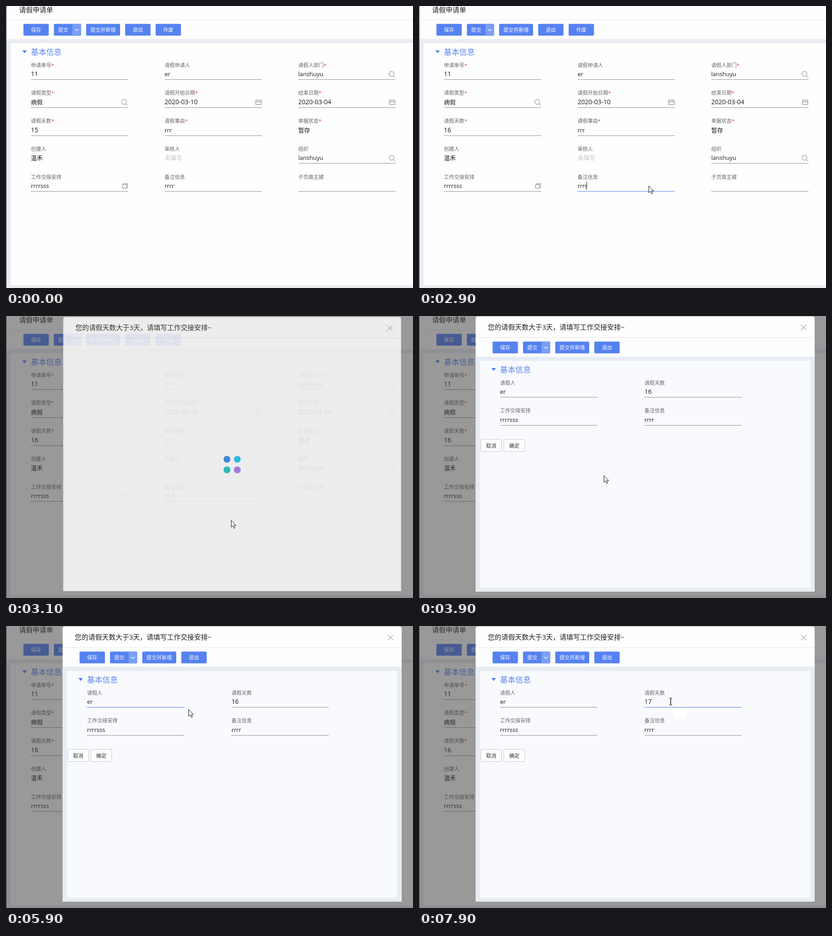
Write an HTML page that moves like this. It is 899 px wide and 623 px high and loops after 8 s.

```html
<!DOCTYPE html>
<html lang="zh">
<head>
<meta charset="utf-8">
<style>
  html, body { margin: 0; width: 100%; height: 100%; overflow: hidden; background: #fefefe; }
  svg { display: block; width: 899px; height: 623px; }
  text { font-family: "Open Sans", "Noto Sans CJK SC", "Noto Sans CJK", sans-serif; fill: #1c1c1c; white-space: pre; }
  .label { font-size: 11.25px; fill: #666; }
  .value { font-size: 13px; }
  .number { font-size: 14px; }
  .empty { fill: #c4c4c4; }
  .title { font-size: 15px; fill: #222; }
  .section { font-size: 17px; fill: #5a84ee; }
  .button { font-size: 11.25px; font-weight: 500; fill: #fff; text-anchor: middle; }
  .plain { font-size: 11.25px; fill: #333; text-anchor: middle; }
  .icon { fill: none; stroke: #777; }
</style>
</head>
<body>
<svg id="stage" viewBox="0 0 899 623"></svg>
<script>
const BLUE = '#5682f1', GREY = '#909090';
const rect = (x, y, w, h, fill, more = '') =>
  `<rect x="${x}" y="${y}" width="${w}" height="${h}" fill="${fill}" ${more}/>`;
const text = (x, y, kind, s, more = '') => `<text x="${x}" y="${y}" class="${kind}" ${more}>${s}</text>`;
const path = (d, more = 'class="icon"') => `<path d="${d}" ${more}/>`;
const group = (id, inner, more = '') => `<g id="${id}" ${more}>${inner}</g>`;
const caret = (id, y) => rect(0, y, 1, 18, '#111', `id="${id}"`);

// icons are drawn relative to the field's left end and label centre
const icons = {
  search: '<circle cx="206" cy="19.5" r="5.5" class="icon"/>' + path('M210 23.500l4 4'),
  date: path('M201.500 16h12v9.500h-12zm0 3.500h12m-9-5v2m6-2v2'),
  popup: path('M202.500 17h8.500v8h-8.500zm2 0v-2h9v8.500h-2.500')
};

function field(x, y, { label, value, must, empty, bare, icon, id = '' }) {
  const kind = (/^\d/.test(value) ? 'value number' : 'value') + (empty ? ' empty' : '');
  return text(x, y + 4, 'label', label + (must ? '<tspan fill="#f04040">*</tspan>' : '')) +
    text(x, y + 24.5, kind, value, id && `id="${id}"`) +
    (bare ? '' : rect(x, Math.floor(y + 32), 215, 1, GREY, id && `id="${id}Line"`)) +
    (icon ? `<g transform="translate(${x} ${y})">${icons[icon]}</g>` : '');
}

const grid = (list, columns, pitch) => list.map((f, i) =>
  field(55 + i % columns * pitch, 130.5 + 61.75 * Math.floor(i / columns), f)).join('');

function toolbar(labels) {
  let x = 38.5;
  return labels.map(label => {
    const split = label === '提交', w = label.length > 2 ? 75 : split ? 60 : 56;
    const s = rect(x, 39.5, w, 26, BLUE, 'rx="2"') +
      (split ? rect(x + 41, 39.5, w - 41, 26, '#7b9ff5', 'rx="2"') +
        path(`M${x + 46.5} 51l4 4 4-4`, 'fill="none" stroke="#fff" stroke-width="1.2"') : '') +
      text(x + (split ? 20.5 : w / 2), 57, 'button', label);
    x += w + 11.25;
    return s;
  }).join('');
}

const section = path('M36 98h10l-5 6.500z', `fill="${BLUE}"`) + text(55, 108, 'section', '基本信息');
const actions = ['保存', '提交', '提交并新增', '退出'];

const page = rect(0, 0, 899, 623, '#fefefe') + rect(0, 30, 899, 1, '#e8eaed') +
  rect(0, 73, 899, 550, '#e9ecf1') + rect(10, 82, 889, 535, '#fefefe') + rect(0, 0, 1, 623, '#39424c') +
  text(29, 13.5, 'title', '请假申请单') + toolbar([...actions, '作废']) + section +
  grid([
    { label: '申请单号', value: '11', must: true },
    { label: '请假申请人', value: 'er' },
    { label: '请假人部门', value: 'lanshuyu', must: true, icon: 'search' },
    { label: '请假类型', value: '病假', must: true, icon: 'search' },
    { label: '请假开始日期', value: '2020-03-10', must: true, icon: 'date' },
    { label: '结束日期', value: '2020-03-04', must: true, icon: 'date' },
    { label: '请假天数', value: '15', must: true, id: 'days' },
    { label: '请假事由', value: 'rrr', must: true },
    { label: '单据状态', value: '暂存', must: true, bare: true },
    { label: '创建人', value: '温禾', bare: true },
    { label: '审核人', value: '未填写', bare: true, empty: true },
    { label: '组织', value: 'lanshuyu', icon: 'search' },
    { label: '工作交接安排', value: 'rrrrsss', icon: 'popup' },
    { label: '备注信息', value: 'rrrr', id: 'memo' },
    { label: '子页面主键', value: '' }
  ], 3, 295.25) + caret('daysCaret', 265) + caret('memoCaret', 388);

const choice = (x, s) => rect(x, 272.5, 46, 27, '#fcfdfe', 'rx="1" stroke="#c6c9ce"') +
  text(x + 23, 290.5, 'plain', s);
const form = rect(125, 90, 749, 519, '#e8ecf3') + rect(125, 48, 749, 42, '#fcfdfe') +
  rect(135, 99, 729.5, 501, '#f8fafd') +
  group('inner', toolbar(actions) + section + grid([
    { label: '请假人', value: 'er', id: 'who' },
    { label: '请假天数', value: '16', id: 'count' },
    { label: '工作交接安排', value: 'rrrrsss' },
    { label: '备注信息', value: 'rrrr' }
  ], 2, 319), 'transform="translate(124 17)"') +
  choice(136.5, '取消') + choice(187.5, '确定') +
  rect(564, 181, 27, 22, '#fff', 'id="hint"') + caret('countCaret', 158);

const dots = ['#3484e4', '#18c3f0', '#1bc1c3', '#a577f0'].map((fill, i) =>
  `<circle cx="${488 + i % 2 * 23}" cy="${316.5 + (i >> 1) * 23.5}" r="7.6" fill="${fill}"/>`).join('');
const modal = path('M125 609V6q0-5 5-5H869q5 0 5 5V609z', 'fill="#fefefe"') +
  rect(125, 47, 749, 1, '#e6e9ee') +
  text(152, 30, 'title', '您的请假天数大于3天，请填写工作交接安排~') +
  path('M843.500 19.500l12 12m0-12l-12 12') + group('loader', dots) + group('form', form);

const pointer =
  path('M.5.5V15.500L4 12.200 6.500 18 9 17 6.500 11.500H11z', 'id="arrow" fill="#fff" stroke="#111"') +
  path('M-3-7.500h2.500q.500 0 .500 1V6.500q0 1-.500 1H-3M3-7.500H.500q-.500 0-.500 1V6.500q0 1 .500 1H3',
    'id="beam" fill="none" stroke="#111"');

document.getElementById('stage').innerHTML = page +
  rect(0, 0, 899, 623, '#373737', 'id="shade" opacity=".5"') +
  group('modal', modal) + group('pointer', pointer);

const $ = id => document.getElementById(id);
const set = (id, name, v) => $(id).setAttribute(name, v);
const show = (id, on) => set(id, 'display', on ? 'inline' : 'none');
const within = (t, a, b) => t >= a && t < b;
const clamp = v => Math.max(0, Math.min(1, v));

// each glide slows down towards its end; some end over a text field
const glides = [
  { from: 100, to: 700, d: 'M741 113Q300 150 204 268', beam: true },
  { from: 2000, to: 2600, d: 'M204 268Q400 460 508 394', beam: true },
  { from: 2900, to: 3100, d: 'M507 397L497 451' },
  { from: 3300, to: 4700, d: 'M497 451Q340 260 333 331' },
  { from: 4700, to: 5200, d: 'M333 331Q345 400 241 239' },
  { from: 5500, to: 5900, d: 'M241 239Q300 150 403 184' },
  { from: 5900, to: 6300, d: 'M403 184Q480 240 556 167', beam: true }
];
for (const g of glides) {
  g.path = document.createElementNS('http://www.w3.org/2000/svg', 'path');
  g.path.setAttribute('d', g.d);
}

function movePointer(t) {
  const g = glides.findLast(g => t >= g.from);
  show('pointer', g);
  if (!g) return;
  const p = clamp((t - g.from) / (g.to - g.from));
  const { x, y } = g.path.getPointAtLength(g.path.getTotalLength() * (1 - (1 - p) ** 1.5));
  set('pointer', 'transform', `translate(${Math.round(x)} ${Math.round(y)})`);
  show('beam', g.beam && p === 1);
  show('arrow', !(g.beam && p === 1));
}

function edit(id, t, value, focused, blinkStart, x) {
  $(id).textContent = value;
  set(id + 'Line', 'fill', focused ? BLUE : GREY);
  show(id + 'Caret', focused && t >= blinkStart && (t - blinkStart) % 1000 < 500);
  set(id + 'Caret', 'x', x + 8 * value.length);
}

function draw(t) {
  movePointer(t);
  edit('days', t, t < 1200 ? '15' : t < 1800 ? '1' : '16', within(t, 800, 2700), 900, 55);
  edit('memo', t, 'rrrr', within(t, 2700, 3200), 2900, 338);
  edit('count', t, t < 6900 ? '16' : t < 7400 ? '1' : '17', t >= 6400, 6400, 498);
  set('whoLine', 'fill', within(t, 5700, 6300) ? BLUE : GREY);

  const opening = clamp((t - 2978) / 147);
  show('shade', opening);
  set('modal', 'opacity', opening);
  set('modal', 'transform', `translate(499.5 305) scale(${1 - .022 * (1 - opening)}) translate(-499.5 -305)`);
  show('loader', t < 3600);
  show('form', t >= 3600);
  show('hint', t >= 6800);
}

const start = performance.now();
function tick() {
  draw(Math.floor((performance.now() - start) % 8000 / 100) * 100);
  requestAnimationFrame(tick);
}
tick();
</script>
</body>
</html>
```
